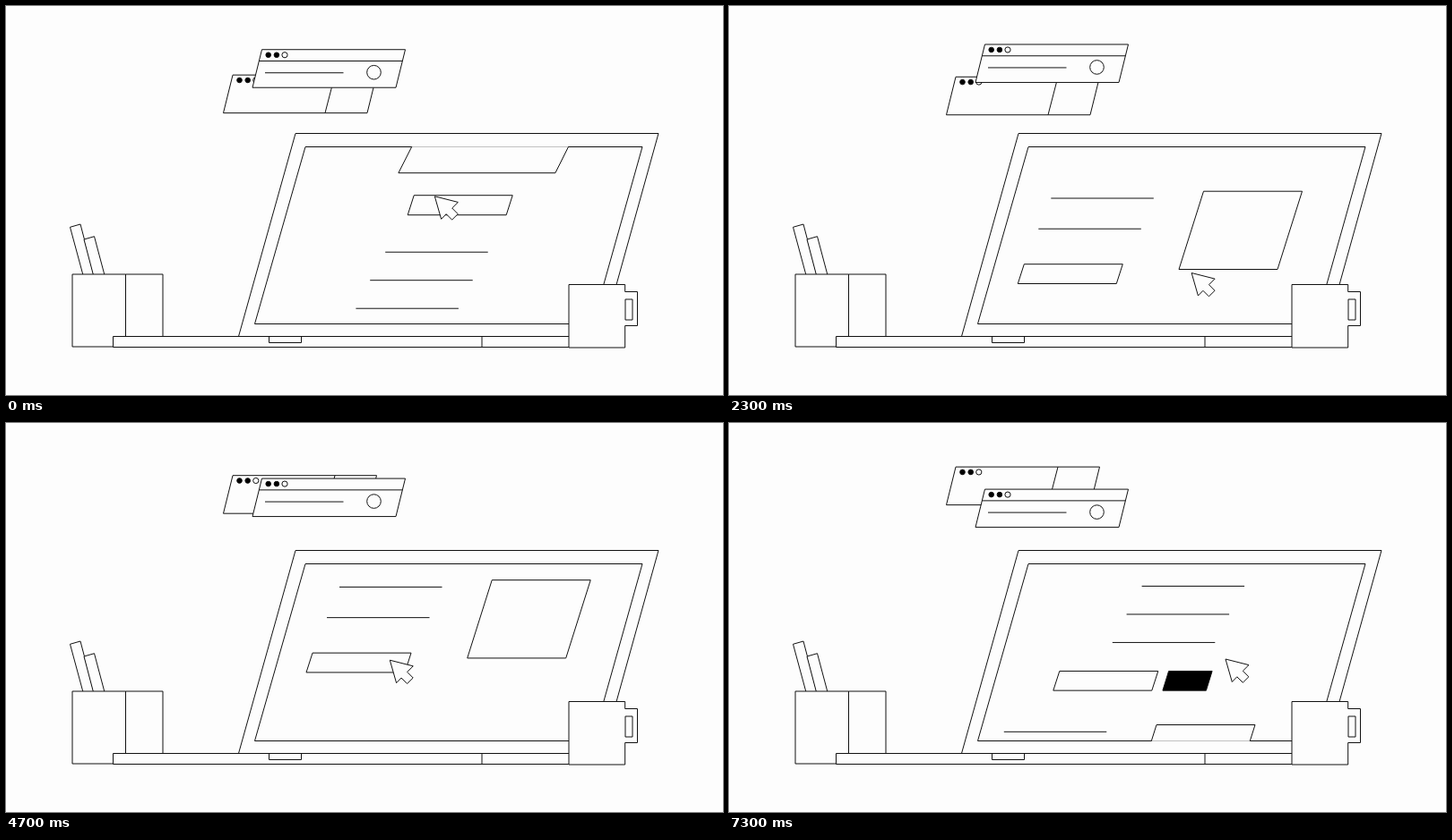
An HTML page for the animation above (7.4 s loop, 800 by 435 pixels).

```html
<!DOCTYPE html>
<html lang="en">
<head>
<meta charset="utf-8">
<title>Laptop with scrolling page</title>
<style>
  html, body { margin: 0; width: 100%; height: 100%; overflow: hidden; background: #fdfdfd; }
  svg { display: block; width: 100%; height: 100%; }
  .ink { fill: #fdfdfd; stroke: #111; stroke-width: 1; }
  .solid { fill: #000; }
</style>
</head>
<body>
<svg viewBox="0 0 800 435" class="ink">
  <defs>
    <clipPath id="screen"><rect x="270" y="157.2" width="450" height="198.6"/></clipPath>
    <g id="dots">
      <circle r="2.8" class="solid"/>
      <circle cx="9.2" r="2.8" class="solid"/>
      <circle cx="18.3" r="3.1"/>
    </g>
  </defs>

  <g id="back">
    <path d="M253 .5h160.500L403 43H242.500z"/>
    <path d="M367 .5L356 43"/>
    <use href="#dots" x="260.500" y="6.300"/>
  </g>
  <g id="front">
    <path d="M285.500 .5h160L435 43H275z"/>
    <path d="M282.400 13.300h160M289 26.500h87.500"/>
    <use href="#dots" x="292.700" y="6.500"/>
    <circle cx="410.500" cy="26" r="7.800"/>
  </g>

  <!-- laptop lid and screen -->
  <path d="M259.500 369.500L323 142.500H728L674 337V369.500z"/>
  <path d="M277.500 355.500L334 157.500H710L654.500 355.500z"/>
  <g clip-path="url(#screen)">
    <g id="article">
      <path d="M475 179h114.500M464 205.500h114.500"/>
      <path d="M428 233.300h174.500L559 320.500H384z"/>
      <path d="M401.300 345.500h110l-7 22h-110z"/>
      <path d="M369.300 409h114.500M352.300 440.500h114.500M336.500 472h114.500"/>
      <path d="M277.500 504h110l-7 21.700h-110z"/>
      <path d="M399.300 504h48.500l-6.700 21.700h-48.500z" class="solid"/>
    </g>
    <g id="hero">
      <path d="M359.300 215h114.500M345.300 249.200h114.500"/>
      <path d="M529.500 207.200h110L612 294.500H502z"/>
      <path d="M329.300 288.700h110l-7 21.800h-110z"/>
    </g>
  </g>

  <!-- pens and holder -->
  <path d="M86 301L71.500 247.300l11.500-3.300L98 301z"/>
  <path d="M97.500 301L87 261l11.500-3.300L110 301z"/>
  <path d="M74 300h59.500v81H74zM133.500 300H175v70h-41.500z"/>

  <!-- base and mug -->
  <path d="M119.500 369.500H640v12H119.500zM531 369.500v12M293.500 369.500h36v7h-36z"/>
  <path d="M628 311.500h62.700v8h13.800v38h-13.800v24.500H628z"/>
  <path d="M691 328h8v23h-8z"/>

  <path id="cursor" d="M0 0l26 6.600-6.600 6.600 6.500 6.600-6.600 6.500-6.500-6.500-5.500 5.700z"/>
</svg>
<script>
  const LOOP = 7400, STEP = 100;
  const CYCLE = 6083, SWAY = CYCLE / 2;
  const SLANT = 0.403;

  const [back, front, article, hero, cursor] =
    ["back", "front", "article", "hero", "cursor"].map(id => document.getElementById(id));

  // Wraps t into one period beginning at `from`.
  const wrap = (t, from, period) => from + ((t - from) % period + period) % period;

  // Goes from 0 to 1 between two times, slow at both ends.
  function ease(t, begin, end) {
    const x = Math.min(1, Math.max(0, (t - begin) / (end - begin)));
    return x * x * (3 - 2 * x);
  }

  const move = (node, x, y) => node.setAttribute("transform", `translate(${x} ${y})`);
  const scroll = (node, distance) => move(node, SLANT * distance, -distance);

  function drawWindows(t) {
    const q = wrap(t, -500, SWAY);
    move(front, 0, 41 + 34 * (ease(q, -440, 1040) - ease(q, 1040, 2480)));
    move(back, 0, 80 - 31.4 * (ease(q, -280, 1100) - ease(q, 1200, 2450)));
  }

  function drawPage(u) {
    const first = ease(u, 4300, 6600), second = ease(u, 6910, 8230);
    scroll(article, -209 + 393.5 * first + 200 * second);
    scroll(hero, first < 1 ? 393.5 * first : 165 * (second - 1));
  }

  function drawCursor(u) {
    const x = 408.5 + 47.5 * ease(u, 4100, 5450) + 98 * ease(u, 5683, 6976)
      - 145.5 * ease(u, 7815, 9515);
    const y = 304 - 93 * ease(u, 4100, 5450) + 53 * ease(u, 5950, 7150)
      + 46 * ease(u, 7305, 8905) - 6 * ease(u, 8905, 9800);
    move(cursor, x, y);
  }

  function tick() {
    const t = Math.floor(performance.now() % LOOP / STEP) * STEP;
    const u = wrap(t, 4000, CYCLE);
    drawWindows(t);
    drawPage(u);
    drawCursor(u);
    requestAnimationFrame(tick);
  }
  tick();
</script>
</body>
</html>
```
